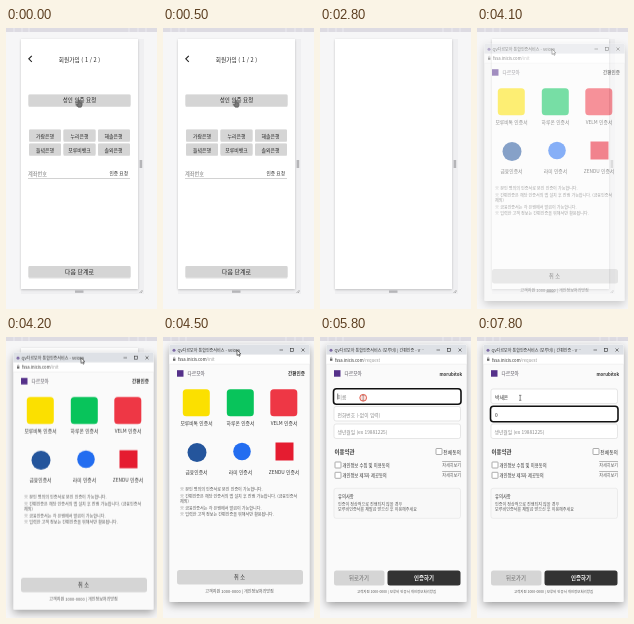
These frames come from a looping animation (151x281 px, 8000 ms). An HTML page:

```html
<!DOCTYPE html>
<html lang="ko">
<head>
<meta charset="utf-8">
<title>회원가입</title>
<style>
html, body { margin: 0; width: 100%; height: 100%; overflow: hidden; background: #f6f6f7; }
svg { display: block; width: 100vw; height: 100vh; }
text { font-family: "Noto Sans CJK KR", "Noto Sans CJK", "Noto Sans", sans-serif; font-size: 4.8px; fill: #333; dominant-baseline: central; }
.mid { text-anchor: middle; }
.end { text-anchor: end; }
.bold { font-weight: 700; }
.signup text { font-weight: 500; fill: #222; }
.banks text { font-size: 4.9px; text-anchor: middle; }
.button { fill: #d5d5d5; }
.small text, .foot { font-size: 4.05px; fill: #555; }
.title { font-size: 4px; }
.url { font-size: 4.2px; }
.hint { fill: #888; }
.field { fill: #fff; stroke: #dcdcdc; stroke-width: .7; }
.box { fill: #fff; stroke: #777; stroke-width: .6; }
.link { font-size: 4.1px; text-anchor: end; text-decoration: underline; fill: #555; }
.ring { fill: #fff; stroke: #111; stroke-width: 1.6; }

/* One loop is 8 s, so 1.25% is 100 ms. */
.anim { animation: 8s step-end infinite; }
.signup { animation-name: signup; }
.hand { animation-name: hand; }
.press { animation-name: press; }
.window { animation-name: window; }
.choose { animation-name: choose; }
.form { animation-name: form; }
.pointer { animation-name: pointer; }
.beam { animation-name: beam; }
.click { animation-name: click; }
.ring1 { animation-name: ring1; }
.ring2 { animation-name: ring2; }
.name-hint { animation-name: name-hint; }
.caret { animation-name: caret; }
.type1 { animation-name: type1; }
.type2 { animation-name: type2; }
.type3 { animation-name: type3; }
.type4 { animation-name: type4; }
.type5 { animation-name: type5; }
.phone-hint { animation-name: phone-hint; }
.digit { animation-name: digit; }

@keyframes signup { 0% { opacity: 1 } 35%, 100% { opacity: 0 } }
@keyframes hand {
  0% { opacity: 1; transform: none }
  16.25% { opacity: 1; transform: translate(-27px, 8px) }
  17.5%, 100% { opacity: 0; transform: translate(-55px, 16px) }
}
@keyframes press {
  0% { opacity: .45; animation-timing-function: steps(9, start) }
  11.25%, 100% { opacity: 0 }
}
@keyframes window {
  0% { opacity: 0; transform: translate(1px, 8px) }
  51.25% { opacity: .55; transform: translate(1px, 8px) }
  52.5% { opacity: 1; transform: translate(1px, 7.7px) }
  53.75% { opacity: 1; transform: translate(.7px, 5px) }
  55% { opacity: 1; transform: translate(.3px, 2px) }
  56.25%, 100% { opacity: 1; transform: none }
}
@keyframes choose { 0% { opacity: 1 } 65%, 100% { opacity: 0 } }
@keyframes form { 0% { opacity: 0 } 65%, 100% { opacity: 1 } }
@keyframes pointer {
  0% { opacity: 1; transform: translate(74px, 13px) }
  58.75% { opacity: 1; transform: translate(74px, 13px); animation-timing-function: steps(3, start) }
  62.5% { opacity: 1; transform: translate(35px, 67px) }
  65% { opacity: 1; transform: translate(35px, 67px); animation-timing-function: steps(3, start) }
  68.75%, 100% { opacity: 0; transform: translate(43px, 61px) }
}
@keyframes beam { 0% { opacity: 0 } 68.75%, 100% { opacity: 1 } }
@keyframes click {
  0% { opacity: 0 }
  71.25% { opacity: .6 }
  72.5% { opacity: 1 }
  73.75% { opacity: .5 }
  75%, 100% { opacity: 0 }
}
@keyframes ring1 { 0% { opacity: 0 } 70% { opacity: .5 } 71.25% { opacity: 1 } 93.75% { opacity: .4 } 95%, 100% { opacity: 0 } }
@keyframes ring2 { 0% { opacity: 0 } 93.75% { opacity: .6 } 95%, 100% { opacity: 1 } }
@keyframes name-hint { 0% { opacity: 1 } 80%, 100% { opacity: 0 } }
@keyframes caret { 0% { opacity: 0 } 71.25% { opacity: 1 } 77.5%, 100% { opacity: 0 } }
@keyframes type1 { 0% { opacity: 0 } 80% { opacity: 1 } 81.25%, 100% { opacity: 0 } }
@keyframes type2 { 0% { opacity: 0 } 81.25% { opacity: 1 } 86.25%, 100% { opacity: 0 } }
@keyframes type3 { 0% { opacity: 0 } 86.25% { opacity: 1 } 87.5%, 100% { opacity: 0 } }
@keyframes type4 { 0% { opacity: 0 } 87.5% { opacity: 1 } 91.25%, 100% { opacity: 0 } }
@keyframes type5 { 0% { opacity: 0 } 91.25%, 100% { opacity: 1 } }
@keyframes phone-hint { 0% { opacity: 1 } 97.5%, 100% { opacity: 0 } }
@keyframes digit { 0% { opacity: 0 } 97.5%, 100% { opacity: 1 } }
</style>
</head>
<body>
<svg viewBox="0 0 151 281" preserveAspectRatio="none">
  <defs>
    <filter id="soft" x="-10%" y="-10%" width="120%" height="120%">
      <feDropShadow dx="0" dy=".8" stdDeviation="1.1" flood-opacity=".22"/>
    </filter>
    <filter id="deep" x="-15%" y="-10%" width="130%" height="125%">
      <feDropShadow dx="0" dy="3" stdDeviation="4" flood-opacity=".35"/>
    </filter>
    <filter id="lift" x="-10%" y="-30%" width="120%" height="180%">
      <feDropShadow dx="0" dy=".5" stdDeviation=".5" flood-opacity=".25"/>
    </filter>
    <rect id="bank" width="32" height="11.5" rx="1" class="button" filter="url(#lift)"/>
    <rect id="wide" x="22.5" width="102" height="11.5" rx="1" class="button" filter="url(#lift)"/>
    <rect id="icon" y="52.2" width="27" height="27" rx="3.5"/>
    <rect id="check" width="6" height="6" rx=".6" class="box"/>
  </defs>

  <!-- Editor canvas -->
  <rect width="151" height="281" fill="#f6f6f7"/>
  <rect width="151" height="4" fill="#dddbe2"/>
  <path d="M8 0v4M16 0v4M23 0v4M123 0v4M132 0v4M140 0v4" stroke="#ebeaf0"/>
  <path d="M132 11h6v255H15v-5h117z" fill="#efeff1"/>
  <rect x="15" y="11" width="117" height="250" fill="#fff" filter="url(#soft)"/>
  <rect x="133.6" y="132" width="2.6" height="8" fill="#b5b5b8"/>
  <rect x="69" y="262.4" width="8.5" height="2.4" fill="#b5b5b8"/>
  <path d="M133.5 265l3-3M135 265l1.5-1.5" stroke="#999" stroke-width=".7"/>

  <g class="anim signup">
    <path d="M25.8 27.8l-3 3 3 3" fill="none" stroke="#222" stroke-width="1.1"/>
    <text x="73.5" y="31" class="mid" style="font-size:5.7px">회원가입 ( 1 / 2 )</text>
    <use href="#wide" y="66.5"/>
    <text x="73.5" y="72" class="mid" style="font-size:5.5px">성인 인증 요청</text>
    <use href="#bank" x="23" y="101.5"/>
    <use href="#bank" x="57.5" y="101.5"/>
    <use href="#bank" x="92" y="101.5"/>
    <use href="#bank" x="23" y="115.5"/>
    <use href="#bank" x="57.5" y="115.5"/>
    <use href="#bank" x="92" y="115.5"/>
    <g class="banks">
      <text x="39" y="107">가람은행</text>
      <text x="73.5" y="107">누리은행</text>
      <text x="107.5" y="107">해솔은행</text>
      <text x="39" y="121">들녘은행</text>
      <text x="73.5" y="121">모루비뱅크</text>
      <text x="107.5" y="121">솔뫼은행</text>
    </g>
    <text x="22" y="145" style="font-size:5.2px;font-weight:400;fill:#777">계좌번호</text>
    <text x="122" y="145" class="end" style="font-size:4.7px">인증 요청</text>
    <path d="M22 150.5h102" stroke="#b4b4b4" stroke-width=".6"/>
    <use href="#wide" y="238"/>
    <text x="73.5" y="243.5" class="mid" style="font-size:6px">다음 단계로</text>
    <g class="anim hand">
      <circle class="anim press" cx="73" cy="75.5" r="3.8" fill="#555"/>
      <path d="M72 72.5q.7-.8 1.4 0v2l2.3.7q.6 1.9-.5 4h-2.9l-2-2.7q.5-.8 1.7.2z" fill="#777" stroke="#444" stroke-width=".5"/>
    </g>
  </g>

  <g class="anim window">
    <rect x="6.5" y="7.8" width="140" height="257.2" rx="1.5" fill="#fafafa" filter="url(#deep)"/>
    <rect x="6.5" y="7.8" width="140" height="10.5" rx="1.5" fill="#dee1e6"/>
    <rect x="6.5" y="17.6" width="140" height="9.5" fill="#fff"/>
    <path d="M6.5 27.2h140" stroke="#e2e2e4" stroke-width=".5"/>
    <circle cx="11" cy="13.2" r="1.5" fill="#7d6aa5"/>
    <path d="M116.5 13h3.5M138.5 11.5l3 3m0-3l-3 3" stroke="#333" stroke-width=".6"/>
    <rect x="127.5" y="11.5" width="3" height="3" fill="none" stroke="#333" stroke-width=".6"/>
    <rect x="10" y="21.6" width="2.4" height="2.2" fill="#666"/>
    <path d="M10.5 21.6v-1q.7-.9 1.4 0v1" fill="none" stroke="#666" stroke-width=".4"/>
    <rect x="14" y="33.2" width="6.5" height="6.5" fill="#55318a"/>
    <text x="24.5" y="36.3" style="font-size:4.7px;font-weight:500;fill:#55515c">다르모아</text>

    <!-- Certificate choice -->
    <g class="anim choose">
      <text x="14.5" y="12.7" class="title">QV다르모아 통합인증서비스 - Velora</text>
      <text x="15" y="22" class="url">fssa.inicis.com<tspan fill="#999">/init</tspan></text>
      <text x="142" y="36.3" class="end bold" style="font-size:4.6px">간편인증</text>
      <use href="#icon" x="19.8" fill="#fbe000"/>
      <use href="#icon" x="63.8" fill="#08c45b"/>
      <use href="#icon" x="107.3" fill="#ee3745"/>
      <circle cx="34" cy="115.5" r="9.5" fill="#24559c"/>
      <circle cx="79" cy="114.5" r="8.8" fill="#236df0"/>
      <rect x="112.5" y="105.5" width="18" height="18" fill="#e51c30"/>
      <g class="mid">
        <text x="33.5" y="85.2">모루비톡 인증서</text>
        <text x="77.5" y="85.2">하루온 인증서</text>
        <text x="121" y="85.2">VELM 인증서</text>
        <text x="33.5" y="134.5">금융인증서</text>
        <text x="77.5" y="134.5">라미 인증서</text>
        <text x="121" y="134.5">ZENDU 인증서</text>
      </g>
      <g class="small">
        <text x="17" y="152.3">※ 본인 명의의 인증서로 본인 인증이 가능합니다.</text>
        <text x="17" y="159">※ 간편인증은 해당 인증서의 앱 설치 후 진행 가능합니다. (금융인증서</text>
        <text x="17" y="164.2">제외)</text>
        <text x="17" y="170.5">※ 금융인증서는 각 은행에서 발급이 가능합니다.</text>
        <text x="17" y="176.7">※ 입력한 고객 정보는 간편인증을 위해서만 활용됩니다.</text>
      </g>
      <rect x="14" y="233" width="126" height="14.5" rx="2.5" class="button"/>
      <text x="76.5" y="239.8" class="mid" style="font-size:5.2px">취 소</text>
      <text x="76.5" y="253.7" class="mid foot">고객지원 1000-0000 | 개인정보처리방침</text>
    </g>

    <!-- Identity form -->
    <g class="anim form">
      <text x="14.5" y="13.3" class="title">QV다르모아 통합인증서비스 (모루비) | 간편인증 - V…</text>
      <text x="15" y="22.5" class="url">fssa.inicis.com<tspan fill="#999">/request</tspan></text>
      <text x="142" y="36.7" class="end bold" style="font-size:4.3px">morubitok</text>
      <rect x="14" y="52" width="126.5" height="14.5" rx="2" class="field"/>
      <rect x="14" y="69.5" width="126.5" height="14.5" rx="2" class="field"/>
      <rect x="14" y="87" width="126.5" height="14.5" rx="2" class="field"/>
      <rect x="13.5" y="51.8" width="127.5" height="15.4" rx="3" class="ring anim ring1"/>
      <rect x="13.5" y="69.3" width="127.5" height="15.4" rx="3" class="ring anim ring2"/>
      <text x="17.5" y="59.8" class="hint anim name-hint">이름</text>
      <path d="M17.7 56.5v6" stroke="#222" stroke-width=".6" class="anim caret"/>
      <g style="font-weight:500">
        <text x="18" y="59.5" class="anim type1">ㅂ</text>
        <text x="18" y="59.5" class="anim type2">박</text>
        <text x="18" y="59.5" class="anim type3">박ㅅ</text>
        <text x="18" y="59.5" class="anim type4">박새</text>
        <text x="18" y="59.5" class="anim type5">박새온</text>
        <text x="18" y="77" class="anim digit">0</text>
      </g>
      <text x="17.5" y="77" class="hint anim phone-hint">전화번호 (-없이 입력)</text>
      <text x="17.5" y="94" class="hint">생년월일 (ex 19881225)</text>

      <text x="14.5" y="114.5" class="bold" style="font-size:5.4px">이용약관</text>
      <use href="#check" x="116" y="111.5"/>
      <text x="141" y="114.5" class="end">전체동의</text>
      <use href="#check" x="15" y="125"/>
      <use href="#check" x="15" y="135.3"/>
      <text x="22.5" y="128" style="font-size:4.3px">개인정보 수집 및 이용동의</text>
      <text x="22.5" y="138.3" style="font-size:4.3px">개인정보 제3자 제공동의</text>
      <text x="141" y="128" class="link">자세히보기</text>
      <text x="141" y="138.3" class="link">자세히보기</text>
      <rect x="14" y="151.3" width="126.5" height="30" rx="2" fill="#f8f8f8" stroke="#e2e2e2" stroke-width=".6"/>
      <text x="18" y="159.2" style="font-size:4.3px;font-weight:500">유의사항</text>
      <g class="small">
        <text x="18" y="166.5">인증이 정상적으로 진행되지 않을 경우</text>
        <text x="18" y="172">모루비인증서를 재발급 받으신 후 이용해주세요</text>
      </g>
      <rect x="14" y="233.5" width="50.5" height="15" rx="2.5" class="button"/>
      <text x="39" y="240.8" class="mid" style="font-size:5.4px;fill:#666">뒤로가기</text>
      <rect x="67.5" y="233.5" width="73" height="15" rx="2.5" fill="#333"/>
      <text x="104" y="240.8" class="mid bold" style="font-size:5.4px;fill:#fff">인증하기</text>
      <text x="76.5" y="254" class="mid foot" style="font-size:3.45px">고객지원 1000-0000 | 모루비 인증서 개인정보처리방침</text>
    </g>

    <path class="anim pointer" d="M0 0v5.5l1.3-1.1.9 1.9.9-.4-.9-1.9h1.7z" fill="#fff" stroke="#222" stroke-width=".6"/>
    <path class="anim beam" d="M42 58.3h2.4M43.2 58.3v5M42 63.3h2.4" fill="none" stroke="#444" stroke-width=".6"/>
    <circle class="anim click" cx="43.2" cy="60.8" r="3.4" fill="#f6a9a0" fill-opacity=".35" stroke="#e0503f" stroke-width=".9"/>
  </g>
</svg>
</body>
</html>
```
